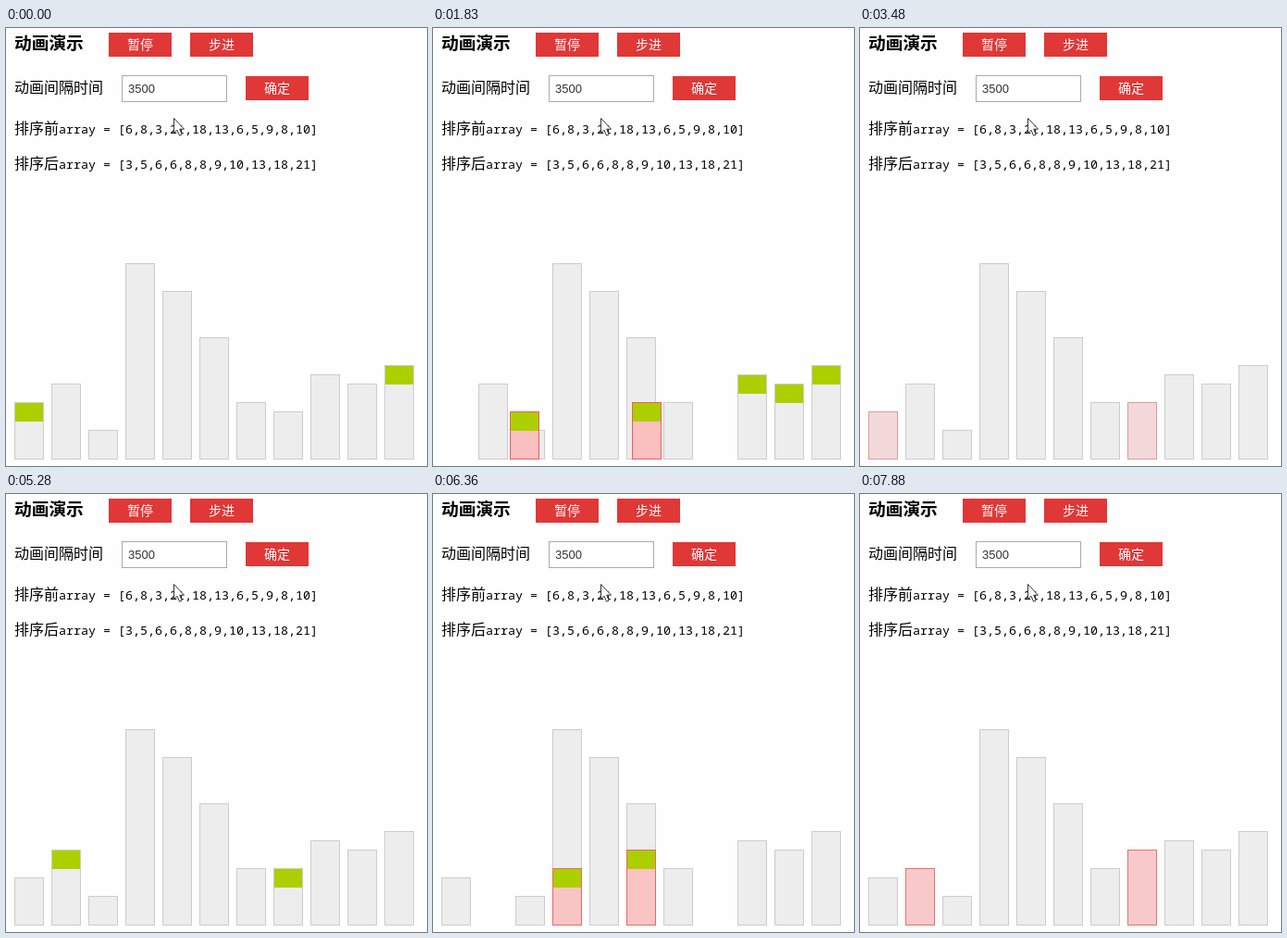
These frames come from a looping animation (455x473 px, 7.99 s). An HTML page:

```html
<!DOCTYPE html>
<html lang="zh-CN">
<head>
<meta charset="utf-8">
<style>
  html, body { margin: 0; width: 100%; height: 100%; overflow: hidden; background: #fefefe; }
  svg { display: block; }
  text { font: 300 16px "Noto Sans CJK SC", "Noto Sans CJK", sans-serif; white-space: pre; }
  .title { font-size: 18.72px; font-weight: bold; }
  .button { fill: #e03737; }
  .caption { font-size: 14px; fill: #fff; }
  .field { font: 13px "Liberation Sans", Arial, sans-serif; fill: #333; }
  .code { font: 300 13.333px "Noto Sans Mono", "Liberation Mono", monospace; }
</style>
</head>
<body>
<svg width="455" height="473" viewBox="0 0 455 473">
  <text class="title" x="9" y="23">动画演示</text>
  <rect class="button" x="111" y="5" width="68" height="26"/>
  <text class="caption" x="131" y="23">暂停</text>
  <rect class="button" x="199" y="5" width="68" height="26"/>
  <text class="caption" x="219" y="23">步进</text>

  <text x="9" y="70">动画间隔时间</text>
  <rect x="125.5" y="51.5" width="113" height="28" fill="#fff" stroke="#aaa"/>
  <text class="field" x="132" y="70">3500</text>
  <rect class="button" x="259" y="52" width="68" height="26"/>
  <text class="caption" x="279" y="70">确定</text>

  <text x="9" y="114">排序前</text>
  <text class="code" x="57" y="114">array = [6,8,3,21,18,13,6,5,9,8,10]</text>
  <text x="9" y="152">排序后</text>
  <text class="code" x="57" y="152">array = [3,5,6,6,8,8,9,10,13,18,21]</text>

  <g id="bars"></g>
  <path d="M181.5 97.5V113.5L185 110.3L187.6 116.2L190.2 115L187.7 109.2H192.5Z" fill="#fff" stroke="#333"/>
</svg>
<script>
const LOOP = 7990;
const values = [6, 8, 3, 21, 18, 13, 6, 5, 9, 8, 10];
// Bars that move are drawn above the others.
const drawOrder = [2, 3, 4, 5, 6, 8, 9, 10, 1, 0, 7];
const swaps = [
  { left: 0, right: 7, gap: 7, start: 1173 },
  { left: 1, right: 0, gap: 6, start: 5752 }
];
const FADE_DELAY = 1690;
// Green markers: bar, time on, time off
const marks = [
  [0, 0, 2990], [10, 0, 2990], [9, 60, 2990], [8, 490, 2990], [7, 990, 2990],
  [0, 4510, 7640], [1, 5280, 7640]
];

// Evenly spaced times, rounded to 10 ms
const steps = (from, to, n) =>
  Array.from({ length: n }, (_, i) => 10 * Math.round((from + (to - from) * i / (n - 1)) / 10));
// The picture refreshes only at these times.
const ticks = [
  0, 60, 490, 990, ...steps(1360, 2120, 14), 2190, 2240,
  ...steps(2990, 3280, 4), 3430, 3480, 3660, 3890, 4510, 5280,
  ...steps(5960, 6710, 14), 6770, 6830, ...steps(7640, 7880, 3)
];

const swing = ms => {
  const p = Math.min(1, Math.max(0, ms / 1000));
  return 0.5 - Math.cos(Math.PI * p) / 2;
};
const mix = (a, b, k) => `rgb(${a.map((v, i) => Math.round(v + (b[i] - v) * k))})`;

const layer = document.getElementById("bars");
function add(parent, name, attrs = {}) {
  const el = document.createElementNS("http://www.w3.org/2000/svg", name);
  for (const key in attrs) el.setAttribute(key, attrs[key]);
  return parent.appendChild(el);
}

const bars = drawOrder.map(id => {
  const group = add(layer, "g");
  const height = values[id] * 10 + 2, top = 466 - height;
  const box = add(group, "rect", { x: 0.5, y: top + 0.5, width: 31, height: height - 1 });
  const mark = add(group, "rect", { x: 1, y: top + 1, width: 30, height: 20, fill: "#accf00" });
  return { id, group, box, mark };
});

function render(time) {
  const t = ticks.findLast(tick => tick <= time + 0.01);
  for (const { id, group, box, mark } of bars) {
    let slot = id, red = 0;
    for (const { left, right, gap, start } of swaps) {
      if (id !== left && id !== right) continue;
      const moved = swing(t - start);
      slot += (id === left ? gap : -gap) * moved;
      red += moved - swing(t - start - FADE_DELAY);
    }
    group.setAttribute("transform", `translate(${Math.round(9 + 40 * slot)})`);
    box.setAttribute("fill", mix([237, 237, 237], [255, 176, 176], red));
    box.setAttribute("stroke", mix([204, 204, 204], [255, 51, 51], red));
    const marked = marks.some(([bar, on, off]) => bar === id && t >= on && t < off);
    mark.setAttribute("visibility", marked ? "visible" : "hidden");
  }
}

const began = performance.now();
function frame() {
  render((performance.now() - began) % LOOP);
  requestAnimationFrame(frame);
}
frame();
</script>
</body>
</html>
```
